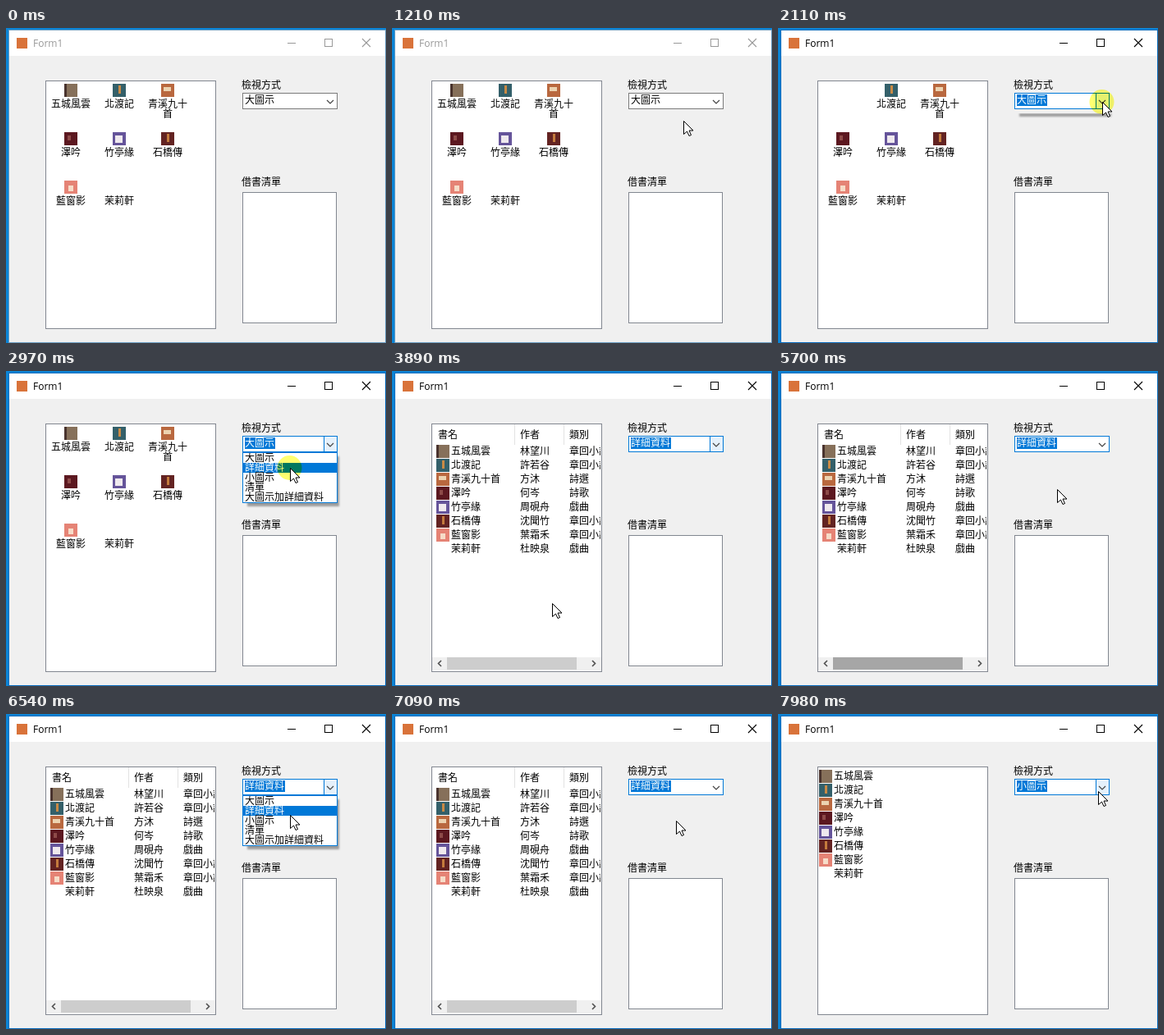
These frames come from a looping animation (463x384 px, 8 s). An HTML page with a canvas:

```html
<!DOCTYPE html>
<html lang="zh-Hant">
<head>
<meta charset="utf-8">
<style>
html, body { margin: 0; width: 100%; height: 100%; overflow: hidden; background: #f0f0f0; }
canvas { display: block; }
</style>
</head>
<body>
<canvas id="stage" width="463" height="384"></canvas>
<script>
const c = document.getElementById('stage').getContext('2d');
const LOOP = 8000, BLUE = '#0078d7';
const CJK = '12px "Noto Sans CJK TC", "Noto Sans CJK", sans-serif';
const views = ['大圖示', '詳細資料', '小圖示', '清單', '大圖示加詳細資料'];

// title, author, category, cover colour, accent colour, accent box
const books = [
  ['五城風雲', '林望川', '章回小說', '#86705a', '#49332e', [0, 0, 3, 16]],
  ['北渡記', '許若谷', '章回小說', '#34606a', '#c98a45', [7, 2, 3, 10]],
  ['青溪九十首', '方沐', '詩選', '#b9683f', '#ecd3b0', [3, 4, 9, 5]],
  ['澤吟', '何岑', '詩歌', '#5c1820', '#8d4a48', [4, 4, 4, 6]],
  ['竹亭緣', '周硯舟', '戲曲', '#65549a', '#efe9ee', [3, 4, 9, 9]],
  ['石橋傳', '沈聞竹', '章回小說', '#632322', '#c47a3c', [7, 2, 3, 10]],
  ['藍窗影', '葉霜禾', '章回小說', '#e58375', '#f6dcc8', [5, 6, 6, 7]],
  ['茉莉軒', '杜映泉', '戲曲']
];

// pointer stops: time, x, y
const path = [
  [590, 139, 376], [1210, 355, 113], [1470, 355, 113], [1900, 395, 90],
  [2390, 395, 90], [2640, 346, 118], [3050, 346, 118], [3610, 400, 81],
  [3680, 400, 81], [3890, 195, 283], [4380, 169, 352], [4520, 169, 352],
  [4660, 181, 352], [4940, 328, 352], [5140, 328, 352], [5400, 169, 352],
  [5480, 169, 352], [5700, 340, 144], [5910, 391, 88], [5980, 391, 88],
  [6100, 397, 83], [6260, 397, 83], [6540, 346, 123], [6680, 346, 130],
  [7100, 346, 130], [7630, 370, 107], [7700, 370, 107], [7980, 390, 94]
];
const presses = [[1970, 2280], [2870, 3020], [4560, 5450], [6100, 6240], [6900, 7040]];
const drops = [[2110, 3020], [6240, 7060]];

const within = (t, [a, b]) => t >= a && t < b;
const clamp = (v, a, b) => Math.min(b, Math.max(a, v));

function rect(x, y, w, h, fill) {
  c.fillStyle = fill;
  c.fillRect(x, y, w, h);
}

function box(x, y, w, h, border, fill) {
  rect(x, y, w, h, border);
  rect(x + 1, y + 1, w - 2, h - 2, fill);
}

function line(color, width, ...pts) {
  c.strokeStyle = color;
  c.lineWidth = width;
  c.beginPath();
  for (let i = 0; i < pts.length; i += 2) c.lineTo(pts[i], pts[i + 1]);
  c.stroke();
}

// y is the middle of the row
function text(s, x, y, color = '#000', align = 'left') {
  c.font = CJK;
  c.fillStyle = color;
  c.textAlign = align;
  c.fillText(s, x, y + 4);
}

function cover(book, x, y) {
  const [, , , base, accent, a] = book;
  if (!base) return;
  rect(x, y, 16, 16, base);
  rect(x + a[0], y + a[1], a[2], a[3], accent);
}

function pointerAt(t) {
  const i = path.findIndex(p => p[0] > t);
  if (i < 0) return path[path.length - 1].slice(1);
  const [t0, x0, y0] = path[i - 1], [t1, x1, y1] = path[i];
  const u = (t - t0) / (t1 - t0), e = u * u * (3 - 2 * u);
  return [x0 + (x1 - x0) * e, y0 + (y1 - y0) * e];
}

function drawWindow(active) {
  const ink = active ? '#000' : '#999';
  rect(0, 0, 463, 384, '#0a84d6');
  box(3, 2, 460, 382, active ? '#0a6cbd' : '#6d9fc4', '#f0f0f0');
  rect(4, 3, 458, 31, '#fff');
  rect(13, 12, 13, 13, '#d9733a');
  c.font = '12px "Open Sans", "Noto Sans", sans-serif';
  c.fillStyle = ink;
  c.textAlign = 'left';
  c.fillText('Form1', 33, 23);
  line(ink, 1, 343, 18.5, 353, 18.5);
  c.strokeRect(388.5, 13.5, 9, 9);
  line(ink, 1.1, 434, 13, 444, 23);
  line(ink, 1.1, 444, 13, 434, 23);
}

function drawLarge(hideFirst) {
  books.forEach((b, i) => {
    if (!i && hideFirst) return;
    const x = 79 + (i % 3) * 59, y = 68 + Math.floor(i / 3) * 59;
    cover(b, x - 8, y);
    text(b[0].slice(0, 4), x, y + 25, '#000', 'center');
    text(b[0].slice(4), x, y + 37, '#000', 'center');
  });
}

function drawSmall() {
  books.forEach((b, i) => {
    cover(b, 50, 68 + i * 17);
    text(b[0], 68, 76 + i * 17);
  });
}

function drawDetails(thumb, hot) {
  c.save();
  c.beginPath();
  c.rect(50, 65, 204, 284);
  c.clip();
  c.translate(-thumb * 4 / 3, 0);
  [['書名', 56], ['作者', 156], ['類別', 216]].forEach(([s, x]) => text(s, x, 78));
  for (const x of [149, 209, 269]) rect(x, 65, 1, 25, '#e2e2e2');
  books.forEach((b, i) => {
    const y = 98 + i * 17;
    cover(b, 54, y - 8);
    text(b[0], 72, y);
    text(b[1], 156, y);
    text(b[2], 216, y);
  });
  c.restore();
  rect(49, 349, 206, 16, '#f0f0f0');
  rect(67 + thumb, 349, 158, 15, hot ? '#a6a6a6' : '#cdcdcd');
  line('#505050', 1.6, 60, 353, 56.5, 356.5, 60, 360);
  line('#505050', 1.6, 244, 353, 247.5, 356.5, 244, 360);
}

function drawCombo(label, active, hot) {
  box(288, 79, 116, 20, active ? BLUE : '#7a7a7a', '#fff');
  if (hot) box(387, 79, 17, 20, BLUE, '#e5f1fb');
  if (active) rect(291, 81, label.length * 12 + 1, 14, BLUE);
  text(label, 291, 88, active ? '#fff' : '#000');
  line('#444', 1.2, 391, 88, 395, 92, 399, 88);
}

function drawDrop(h, picked) {
  c.save();
  c.filter = 'blur(1px)';
  rect(294, 104, 112, Math.max(4, h - 1), 'rgba(0,0,0,.35)');
  c.restore();
  if (h < 6) return rect(288, 99, 118, 5, '#f0f0f0');
  box(288, 99, 116, h, BLUE, '#fff');
  c.save();
  c.beginPath();
  c.rect(289, 100, 114, h - 2);
  c.clip();
  views.forEach((s, i) => {
    if (i === picked) rect(289, 100 + i * 12, 114, 12, BLUE);
    text(s, 291, 106 + i * 12, i === picked ? '#fff' : '#000');
  });
  c.restore();
}

function drawPointer(x, y, pressed) {
  if (pressed) {
    c.globalCompositeOperation = 'multiply';
    c.fillStyle = '#ffff70';
    c.beginPath();
    c.arc(x - 0.5, y, 15, 0, 7);
    c.fill();
    c.globalCompositeOperation = 'source-over';
  }
  c.save();
  c.translate(x + 0.5, y + 0.5);
  c.fillStyle = '#fff';
  c.strokeStyle = '#000';
  c.lineWidth = 1;
  c.beginPath();
  for (const [a, b] of [[0, 0], [0, 16], [4, 12.5], [6.5, 18], [9, 17], [6.5, 11.5], [11.5, 11.5]]) c.lineTo(a, b);
  c.closePath();
  c.fill();
  c.stroke();
  c.restore();
}

function draw(t) {
  const active = t >= 2040;
  const view = t < 3050 ? 0 : t < 7100 ? 1 : 2;
  const [x, y] = t < 590 ? [-99, -99] : pointerAt(t);
  const drop = drops.find(d => within(t, d));
  const overButton = x >= 386 && x < 404 && y >= 79 && y < 99;

  drawWindow(active);
  box(48, 64, 208, 303, '#828790', '#fff');
  if (view === 0) drawLarge(within(t, [2040, 2320]));
  if (view === 1) {
    const thumb = within(t, [4520, 5400]) ? clamp(x - 169, 0, 12) : 0;
    drawDetails(thumb, within(t, [4310, 5870]));
  }
  if (view === 2) drawSmall();

  text('檢視方式', 287, 70);
  text('借書清單', 287, 188);
  box(288, 200, 115, 160, '#828790', '#fff');
  drawCombo(views[view], active, overButton || drop || within(t, [3610, 3950]));
  if (drop) {
    const inside = x > 288 && x < 404 && y >= 100 && y < 160;
    const h = Math.round(62 * clamp((t - drop[0] - 30) / 180, 0, 1));
    drawDrop(h, inside ? Math.floor((y - 100) / 12) : view);
  }
  if (t >= 590) drawPointer(Math.round(x), Math.round(y), presses.some(p => within(t, p)));
}

function tick() {
  draw(performance.now() % LOOP);
  requestAnimationFrame(tick);
}
tick();
</script>
</body>
</html>
```
